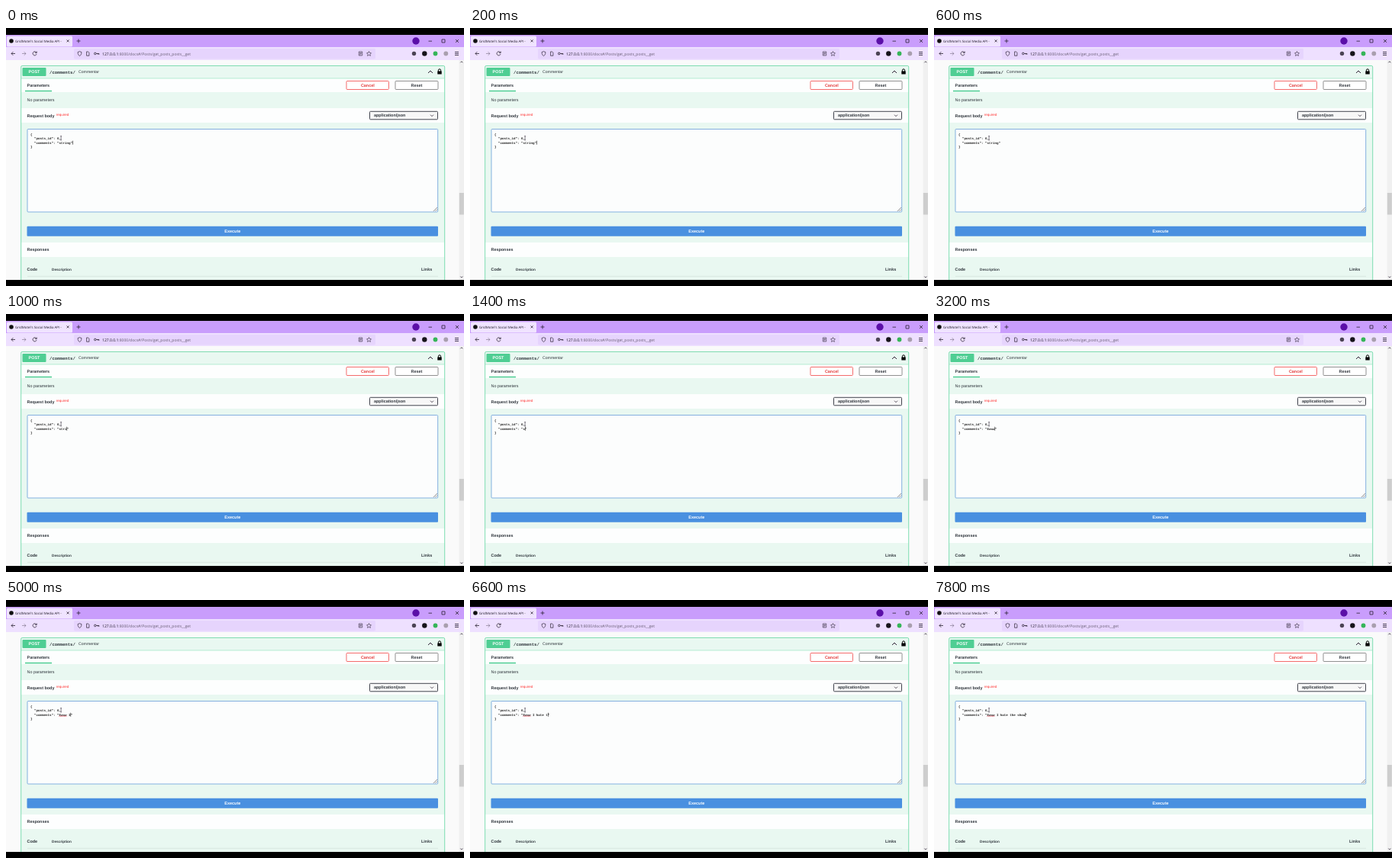
An HTML page that plays this animation: 600 px wide and 338 px high, repeating every 8 s.

```html
<!DOCTYPE html>
<html lang="en">
<head>
<meta charset="utf-8">
<title>API docs</title>
<style>
  html, body { margin: 0; width: 100%; height: 100%; overflow: hidden; background: #000; }
  svg { display: block; width: 100vw; height: 100vh; }
  text { font: 5.45px "Liberation Sans", Arial, sans-serif; fill: #30363d; white-space: pre; text-rendering: geometricPrecision; }
  .b { font-weight: 700; }
  .mid { text-anchor: middle; }
  .ui { font-family: "Open Sans", "Noto Sans", sans-serif; fill: #1b1522; }
  .code { font: 700 4.165px "Liberation Mono", monospace; fill: #222; }
  .line { fill: none; stroke: #2b2333; stroke-width: .8; }
</style>
</head>
<body>
<svg viewBox="0 0 600 338" preserveAspectRatio="none">
  <rect width="600" height="338"/>

  <!-- tab strip -->
  <rect y="9" width="600" height="17" fill="#c99dfc"/>
  <rect x="1" y="10.5" width="86" height="14" rx="1.5" fill="#f0e4ff"/>
  <circle cx="7" cy="17" r="2.8" fill="#111"/>
  <text class="ui" x="12" y="18.7" style="font-size:4.42px">GridMotel's Social Media API -</text>
  <path class="line" d="M79.6 15.4l3 3m0-3l-3 3M92.5 17h5m-2.5-2.5v5"/>
  <circle cx="537" cy="17" r="4.7" fill="#5b0fa8"/>
  <path class="line" d="M553.5 17.2h4.5M571 15h4v4h-4zM589 15l4 4m0-4l-4 4"/>

  <!-- toolbar -->
  <rect y="25" width="600" height="17.5" fill="#eee0ff"/>
  <rect x="89" y="27" width="395" height="13.5" rx="1.5" fill="#e6d4fd"/>
  <path class="line" d="M12 33.5H7m2.3-2.3L7 33.5l2.3 2.3"/>
  <path class="line" d="M21 33.5h5m-2.3-2.3l2.3 2.3-2.3 2.3" opacity=".45"/>
  <path class="line" d="M39.8 32.2a2.5 2.5 0 1 0 .2 2M40.2 30.6v2h-2"/>
  <path class="line" d="M96.5 30.7l2.4.9c0 2.6-.7 4-2.4 5-1.7-1-2.4-2.4-2.4-5zM105.6 31h2l1.3 1.3v4h-3.3z" style="stroke-width:.7"/>
  <path class="line" d="M118.2 33.5h3.7v1.4m-1.5-1.4v1.2"/>
  <circle class="line" cx="116.8" cy="33.5" r="1.3"/>
  <text class="ui" x="126" y="35.5" style="font-size:5.05px">127.0.0.1<tspan fill="#655b70">:8000/docs#/Posts/get_posts_posts__get</tspan></text>
  <path class="line" d="M462.3 31h4.4v5h-4.4zm1 1.5h2.4m-2.4 1.2h2.4m-2.4 1.2h1.5" style="stroke-width:.6"/>
  <path class="line" d="M475.5 30.6l.9 1.9 2.1.3-1.5 1.5.4 2.1-1.9-1-1.9 1 .4-2.1-1.5-1.5 2.1-.3z" style="stroke-width:.6"/>
  <circle cx="534.5" cy="33.5" r="2.7" fill="#4c4455"/>
  <circle cx="548.3" cy="33.5" r="3.2" fill="#16131a"/>
  <circle cx="562.5" cy="33.5" r="2.9" fill="#35b558"/>
  <circle cx="576.3" cy="33.5" r="2.9" fill="#a99fae"/>
  <path class="line" d="M588 31.5h5m-5 2h5m-5 2h5"/>

  <!-- page -->
  <rect y="42" width="600" height="288" fill="#fafafa"/>
  <rect x="19.7" y="49.5" width="555" height="281" fill="#e9f8f1"/>
  <rect x="20" y="66" width="554.5" height="18" fill="#fdfefe"/>
  <rect x="20" y="105" width="554.5" height="19" fill="#fdfefe"/>
  <rect x="20" y="281" width="554.5" height="19" fill="#fdfefe"/>
  <path d="M19.7 330V51q0-1.5 1.5-1.5h552q1.5 0 1.5 1.5v279" fill="none" stroke="#61d6a0" stroke-width=".8"/>
  <path d="M20 66h554.5" stroke="#8ce0ba" stroke-width=".6"/>

  <rect x="21.5" y="52" width="31" height="11" rx="1" fill="#4fce93"/>
  <text class="b mid" x="37" y="59.3" style="fill:#fff">POST</text>
  <text x="57" y="59.5" style="font:700 5.65px 'Liberation Mono',monospace">/comments/</text>
  <text x="95" y="59.2" style="font-size:5.17px">Commentar</text>
  <path class="line" d="M553 59l3-3 3 3" style="stroke-width:1"/>
  <path d="M565.3 56.5h5.4v4h-5.4z"/>
  <path class="line" d="M566.4 57v-1.6a1.6 1.6 0 0 1 3.2 0V57" style="stroke:#000;stroke-width:1"/>

  <text class="b" x="27.5" y="76.8">Parameters</text>
  <rect x="25" y="81.8" width="35" height="1.5" fill="#49cc90"/>
  <g fill="#fff" stroke-width=".9">
    <rect x="446" y="69.5" width="55.5" height="11" rx="1" stroke="#f25c5c"/>
    <rect x="510" y="69.5" width="56" height="11" rx="1" stroke="#858585"/>
  </g>
  <text class="b mid" x="473.8" y="76.9" style="fill:#e33a3a">Cancel</text>
  <text class="b mid" x="538" y="76.9">Reset</text>

  <text x="27.5" y="95.6">No parameters</text>
  <text class="b" x="27.5" y="116.5">Request body</text>
  <text x="65.7" y="114.5" style="font-size:4.5px;fill:#f33">required</text>
  <rect x="476.5" y="109.3" width="89" height="10.5" rx="1" fill="#f7f7f7" stroke="#41444e"/>
  <text class="b" x="482" y="116.4">application/json</text>
  <path class="line" d="M556 113.7l2 2 2-2"/>

  <rect x="28" y="132.5" width="537.7" height="108.5" rx="1" fill="#fcfdfd" stroke="#78a9dd" stroke-width=".9"/>
  <path d="M560 240l5-5m-2.5 5l2.5-2.5" stroke="#666" stroke-width=".7"/>
  <text class="code" x="32" y="141">{</text>
  <text class="code" x="32" y="146.4">  "posts_id": 6,</text>
  <text class="code" x="32" y="151.7" id="comment"></text>
  <text class="code" x="32" y="157.1">}</text>
  <path id="squiggle" d="M69.5 152.5l.83-.7.83.7.83-.7.83.7.83-.7.83.7.83-.7.83.7.83-.7.83.7.83-.7.83.7" fill="none" stroke="#e5283b" stroke-width=".6"/>
  <rect id="caret" y="147.7" width=".6" height="5" fill="#111"/>
  <path class="line" d="M71.2 141.6h1.8m-.9 0v5.2m-.9 0h1.8" style="stroke-width:.6"/>

  <rect x="27.5" y="259.7" width="538.5" height="13" rx="1" fill="#4990e0"/>
  <text class="b mid" x="296.8" y="268.1" style="fill:#fff">Execute</text>
  <text class="b" x="27.5" y="292.4">Responses</text>
  <text class="b" x="27.5" y="318">Code</text>
  <text class="b" x="60" y="317.8" style="font-size:4.7px">Description</text>
  <text class="b" x="544" y="318">Links</text>
  <path d="M28 325.3h538" stroke="#c5d4cd" stroke-width=".5"/>

  <!-- scrollbar -->
  <rect x="593.5" y="42" width="6.5" height="288" fill="#f0f0f0"/>
  <rect x="593.8" y="216" width="6" height="28.5" fill="#cdcdcd"/>
  <path class="line" d="M595.3 45.3l1.5-1.5 1.5 1.5M595.3 325.5l1.5 1.5 1.5-1.5"/>
  <rect y="330" width="600" height="8"/>
</svg>
<script>
  const LOOP = 8000, CHAR = 2.5, VALUE_X = 69.5;
  // [time in ms, value between the quotes]
  const typing = [
    [0, 'string'], [800, 'strin'], [1000, 'stri'], [1200, 'st'], [1400, 's'], [1600, ''],
    [2600, 'E'], [2800, 'Ew'], [3000, 'Eww'], [3200, 'Ewww'], [3800, 'Ewww '],
    [4800, 'Ewww I'], [5200, 'Ewww I '],
    [6000, 'Ewww I h'], [6200, 'Ewww I hat'], [6400, 'Ewww I hate '], [6600, 'Ewww I hate t'],
    [6800, 'Ewww I hate the'], [7000, 'Ewww I hate the '],
    [7200, 'Ewww I hate the s'], [7400, 'Ewww I hate the sh'],
    [7600, 'Ewww I hate the sho'], [7800, 'Ewww I hate the show']
  ];
  const [comment, squiggle, caret] = ['comment', 'squiggle', 'caret'].map(id => document.getElementById(id));

  function draw(now) {
    const t = Math.floor(now % LOOP / 200) * 200;
    const [since, value] = typing.filter(([start]) => start <= t).pop();
    const column = value.length + (t < 400 ? 1 : 0);
    const blinkOn = (t - since) % 1000 < 500;
    comment.textContent = `  "comments": "${value}"`;
    caret.setAttribute('x', VALUE_X + column * CHAR);
    caret.setAttribute('visibility', blinkOn ? 'visible' : 'hidden');
    squiggle.setAttribute('visibility', value.startsWith('Ewww ') ? 'visible' : 'hidden');
  }

  const start = performance.now();
  function tick() {
    draw(performance.now() - start);
    requestAnimationFrame(tick);
  }
  tick();
</script>
</body>
</html>
```
